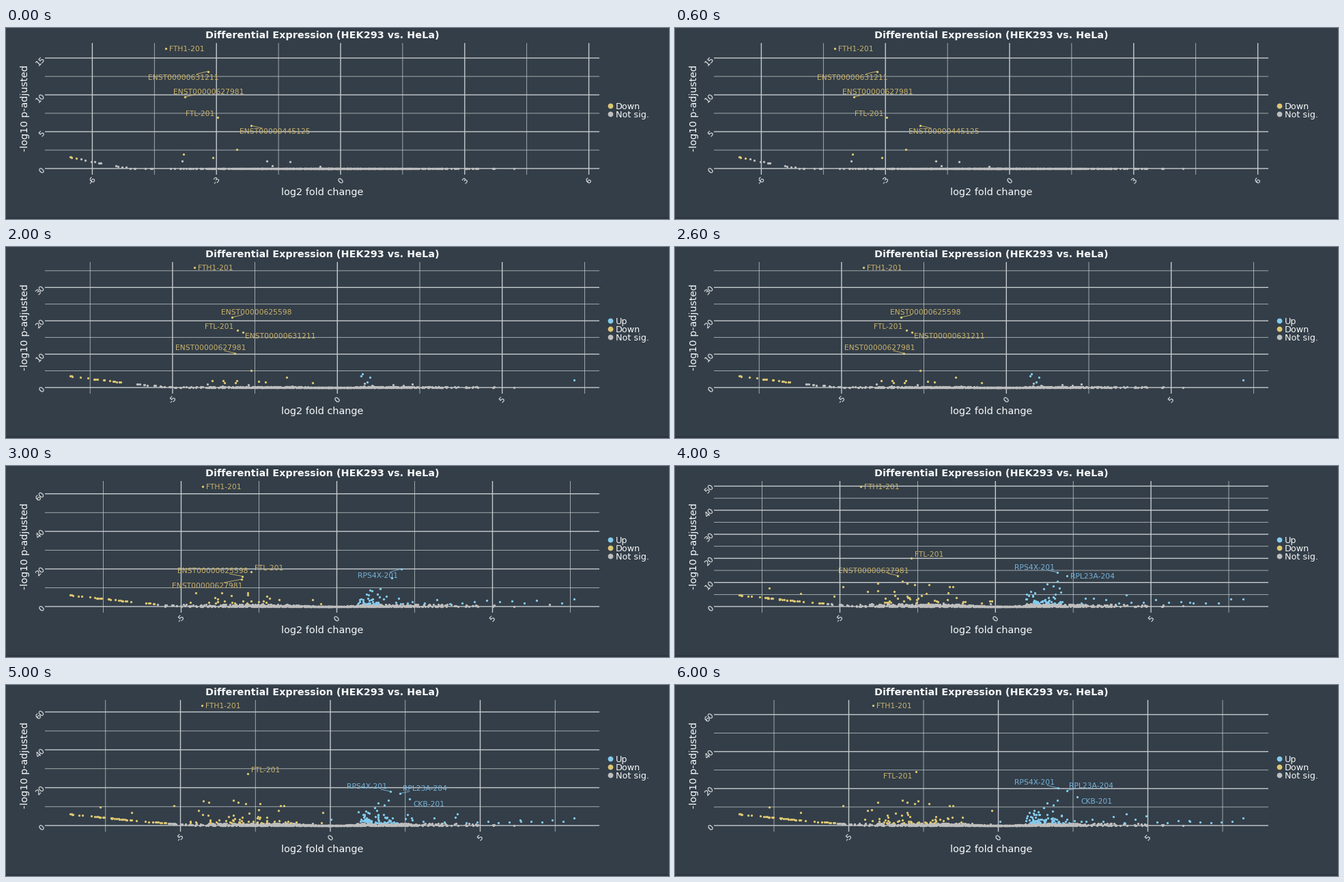
Animation of 971 by 280 pixels, one loop 7000 ms. Source, as a matplotlib script:

```python
import numpy as np
import matplotlib.pyplot as plt
from matplotlib.animation import FuncAnimation
from matplotlib.patches import Rectangle

W, H, DPI = 971, 280, 100
PT = 72 / DPI                       # points per pixel
LEFT, RIGHT, TOP, BOTTOM, ZERO = 57, 869, 22, 215, 206
FIRST, LAST = 94, 832               # outermost points
CUTOFF = 1.3                        # significance on the y scale

BG, STRIP, INK = "#333e48", "#2e3842", "#f7f8f9"
GRID = "#c6cbce"
COLORS = {"Up": "#83caee", "Down": "#dcc672", "Not sig.": "#bebebe"}
LABELS = {"Up": "#78b2d9", "Down": "#ccb36c"}

# axes: x of zero, x step, its pixels, y step, its pixels
# tail: where the left tail meets the zero line
# counts: points in the left fan, right fan and right tail
# labels: text, point x, y and the offset of the label's centre, in pixels
SCENES = [
    dict(axes=(490, 3, 181.8, 5, 54), tail=190, counts=(8, 0, 0), spread=0.3,
         labels=[("FTH1-201", 234, 30, 30.5, 0), ("ENST00000631211", 296, 63.5, -36, 8.5),
                 ("ENST00000627981", 262, 101, 35, -8), ("FTL-201", 310, 131, -26, -6),
                 ("ENST00000445125", 359, 143, 35, 8.5)]),
    dict(axes=(487, 4, 205.5, 10, 54.3), tail=245, counts=(14, 16, 2), spread=1,
         labels=[("FTH1-201", 272, 30, 31, 0), ("ENST00000631211", 340, 107, 36, -7.5),
                 ("FTL-201", 336, 124, 26.5, -6), ("ENST00000625598", 323, 136, -43.5, -8),
                 ("ENST00000627981", 326, 143.5, 31, 8)]),
    dict(axes=(485.3, 5, 241.4, 10, 48.9), tail=250, counts=(18, 16, 2), spread=1.5,
         labels=[("FTH1-201", 276, 30, 30.5, 0), ("ENST00000625598", 331, 103, 35.5, -8),
                 ("FTL-201", 339, 122, -26.5, -6), ("ENST00000631211", 347, 125, 55, 5.5),
                 ("ENST00000627981", 335, 155.5, -35.5, -8)]),
    dict(axes=(484.5, 5, 228, 20, 55.1), tail=270, counts=(55, 75, 14), spread=3,
         labels=[("FTH1-201", 288, 30, 31, 0), ("FTL-201", 359, 154.5, 26.5, -5.5),
                 ("ENST00000625598", 346, 161.5, -43.5, -8),
                 ("ENST00000627981", 345, 166, -50, 9.5), ("RPS4X-201", 579, 151, -34, 9)]),
    dict(axes=(469.3, 5, 227.8, 10, 35.3), tail=280, counts=(80, 95, 14), spread=3.5,
         labels=[("FTH1-201", 272, 30, 31, 0), ("FTL-201", 346, 135, 26.5, -5.5),
                 ("ENST00000627981", 326, 160.5, -35, -7.5),
                 ("RPS4X-201", 560, 156, -34, -7.5), ("RPL23A-204", 574, 161, 38, 0.5)]),
    dict(axes=(475, 5, 219.5, 20, 55.5), tail=285, counts=(90, 105, 16), spread=3.5,
         labels=[("FTH1-201", 287, 30, 31, 0), ("FTL-201", 354, 130, 26.5, -5.5),
                 ("RPS4X-201", 563, 156, -35, -7.5), ("RPL23A-204", 577, 159, 36, -7.5),
                 ("CKB-201", 591, 167, 28, 7)]),
    dict(axes=(473.5, 5, 219, 20, 54.2), tail=285, counts=(92, 110, 16), spread=3.5,
         labels=[("FTH1-201", 290, 30, 31, 0), ("FTL-201", 353, 126.5, -26.5, 6.5),
                 ("RPS4X-201", 561, 151, -34.5, -8.5), ("RPL23A-204", 574, 154.5, 36, -7.5),
                 ("CKB-201", 589, 163.5, 28.5, 7)]),
]

# Outliers that stay almost still once the data has settled
STEADY = [(138, 179), (184, 187), (246, 177), (282, 184), (297, 172), (333, 169),
          (340, 172), (351, 174), (372, 174), (402, 177), (407, 177),
          (560, 169), (545, 173), (554, 176), (540, 180), (661, 189), (754, 200)]

plt.rcParams["font.family"] = "DejaVu Sans"
fig = plt.figure(figsize=(W / DPI, H / DPI), dpi=DPI, facecolor=BG)
ax = fig.add_axes([0, 0, 1, 1])


def write(text, x, y, size, color=INK, angle=0, ha="center", **kw):
    """Place text so that the middle of its capitals is at (x, y)."""
    a = np.radians(angle)
    rise = 0.365 * size
    ax.text(x + rise * np.sin(a), y + rise * np.cos(a), text, fontsize=size * PT,
            color=color, rotation=angle, rotation_mode="anchor", ha=ha,
            va="baseline", zorder=5, **kw)


def line(xs, ys, color, width, z):
    ax.plot(xs, ys, color=color, lw=width * PT, zorder=z,
            solid_capstyle="butt", snap=False)


def dots(x, y, color, diameter=3.3, z=3):
    ax.scatter(x, y, s=(diameter * PT) ** 2, color=color, linewidths=0, zorder=z)


def draw_grid(x0, x_step, x_px, y_step, y_px):
    for half in range(-5, 13):
        major = half % 2 == 0
        width, z = (1.4, 2) if major else (0.75, 1)
        x, y = x0 + half * x_px / 2, ZERO - half * y_px / 2
        if LEFT < x < RIGHT:
            line([x, x], [TOP, BOTTOM], GRID, width, z)
            if major:
                write(str(half // 2 * x_step), x - 0.5, 223, 11.5, angle=45)
        if TOP < y <= ZERO:
            line([LEFT, RIGHT], [y, y], GRID, width, z)
            if major:
                text = str(half // 2 * y_step)
                wide = len(text) - 1
                write(text, 51.5 - 2 * wide, y + 2 + 1.5 * wide, 11.5, angle=45)


def draw_legend(kinds):
    top = 120.3 - 6 * (len(kinds) - 1)
    for i, kind in enumerate(kinds):
        y = top + 12 * i
        dots([884.8], [y], COLORS[kind], 7.8)
        write(kind, 892.8, y, 12.8, ha="left")


def draw_label(text, x, y, dx, dy):
    color = LABELS["Up" if x > W / 2 else "Down"]
    write(text, x + dx, y + dy, 10.75, color)
    if abs(dy) > 7.2:
        # leader towards the label's centre, up to the edge of its box
        t = 1 - min(4.5 / abs(dy), 3.3 * len(text) / abs(dx))
        line([x, x + t * dx], [y, y + t * dy], color, 0.9, 3)


def volcano(i, tail, counts, spread):
    """Pixel x and height above the zero line of all unlabelled points."""
    rng = np.random.default_rng(7)
    left, right, far = counts

    ridge = rng.normal(478, 105, 680)
    ridge = ridge[(ridge > tail - 10) & (ridge < 765)]
    valley = np.minimum(1, np.abs(ridge - 475) / 55) ** 2
    ridge_h = spread * valley * rng.random(len(ridge)) ** 2

    t = rng.random(16 + 10 * min(i, 5)) ** 1.3
    t[0] = 1
    arc_h = 16.8 * t ** 1.2 + rng.uniform(-0.6, 0.6, len(t)) * (1 - t)

    fan_l = rng.normal(350, 42, left)
    fan_l_h = max(6, 20 - 5 * i) * rng.exponential(1, left)
    fan_r = 510 + rng.gamma(3, 11, right)
    fan_r_h = 6 * rng.exponential(1, right)

    far_x = np.linspace(595, LAST, far) if far else np.empty(0)
    far_h = 3 + rng.gamma(2, 2, far)
    far_h[-1:] = 11

    x = np.concatenate([ridge, tail - t * (tail - FIRST), fan_l, fan_r, far_x])
    h = np.concatenate([ridge_h, arc_h, fan_l_h, fan_r_h, far_h])
    return x, h


def update(i):
    scene = SCENES[i]
    axes, labels = scene["axes"], scene["labels"]
    ax.clear()
    ax.set(xlim=(0, W), ylim=(H, 0))
    ax.axis("off")
    ax.add_patch(Rectangle((0, 277), W, 3, color=STRIP, lw=0))

    write("Differential Expression (HEK293 vs. HeLa)", 463, 10, 14.35, weight="bold")
    write("log2 fold change", 463, 240, 14.4)
    write("-log10 p-adjusted", 27, 118, 14.4, angle=90)
    draw_grid(*axes)

    x, h = volcano(i, scene["tail"], scene["counts"], scene["spread"])
    marked = [label[1:3] for label in labels] + (STEADY if i >= 4 else [])
    mx, my = np.transpose(marked)
    x, y = np.append(x, mx), np.append(ZERO - h, my)

    significant = ZERO - y > CUTOFF * axes[4] / axes[3]
    groups = {"Up": significant & (x > axes[0]),
              "Down": significant & (x < axes[0]),
              "Not sig.": ~significant}
    for kind, group in groups.items():
        dots(x[group], y[group], COLORS[kind], z=3 if kind == "Not sig." else 4)
    draw_legend([kind for kind, group in groups.items() if group.any()])

    for label in labels:
        draw_label(*label)
    return []


anim = FuncAnimation(fig, update, frames=len(SCENES), interval=1000,
                     init_func=lambda: [], repeat=True, repeat_delay=0)
plt.show()
```
